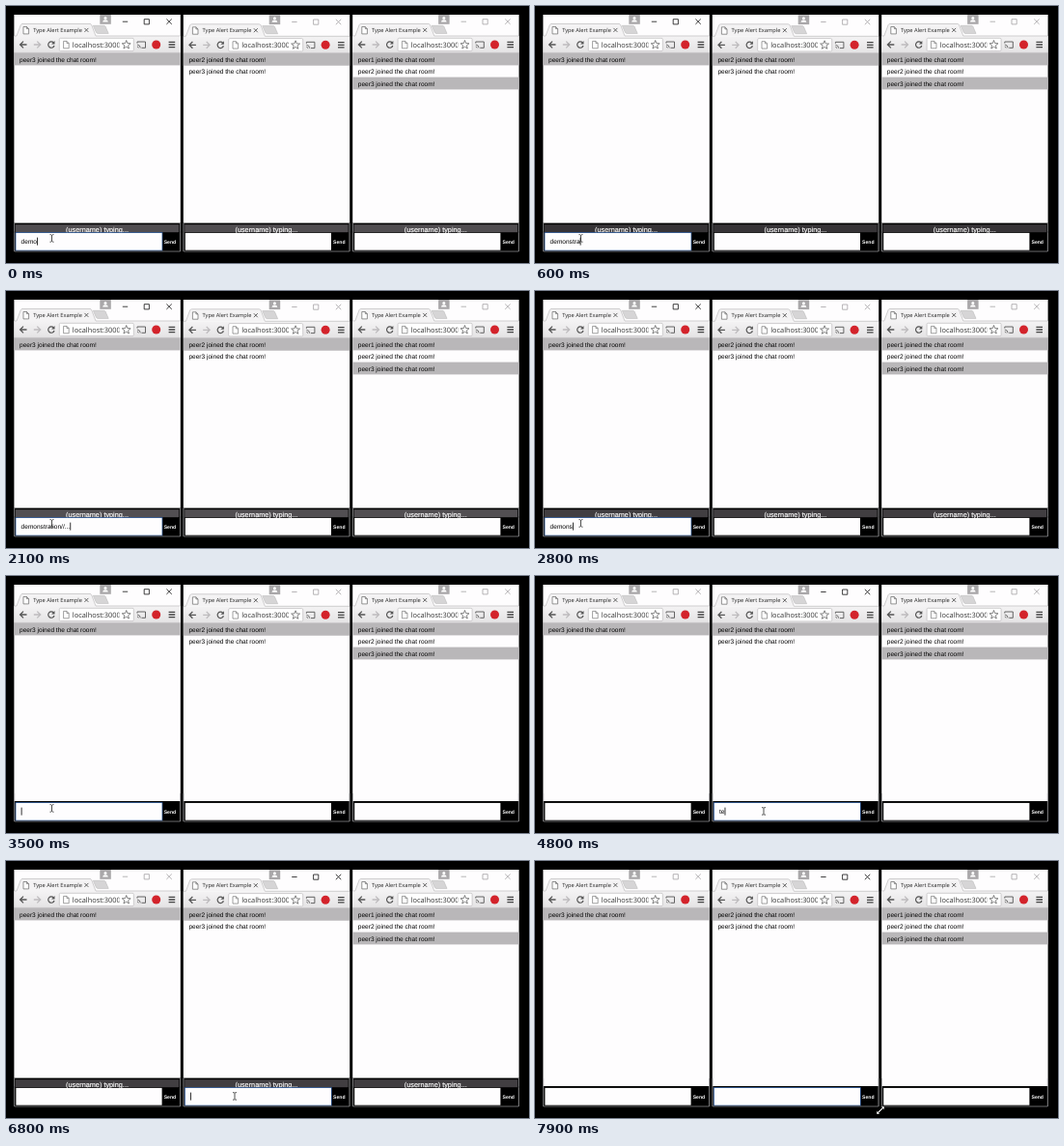
Recreate the animation shown at these times as an HTML page. Size 542x266 px, loop 8 s.

```html
<!DOCTYPE html>
<html lang="en">
<head>
<meta charset="utf-8">
<title>Type Alert Example</title>
<style>
  html, body { margin: 0; width: 100%; height: 100%; overflow: hidden; background: #000; }
  svg { display: block; width: 542px; height: 266px; }
  text { font-family: "Liberation Sans", Arial, sans-serif; font-size: 6.56px; fill: #000; text-rendering: geometricPrecision; white-space: pre; }
  .ui { font-family: "Open Sans", "Noto Sans", sans-serif; fill: #333; }
  .title { font-size: 5.7px; fill: #222; }
  .url { font-size: 7.4px; }
  .send { font-size: 5.1px; font-weight: bold; fill: #fff; }
  .alert { font-size: 7.3px; fill: #fff; stroke: #fff; stroke-width: .15px; text-anchor: middle; }
  .field { fill: #fefdfe; stroke-width: 1.5px; paint-order: stroke; }
</style>
</head>
<body>
<svg id="stage" viewBox="0 0 542 266">
  <defs>
    <linearGradient id="tool" x1="0" y1="0" x2="0" y2="1">
      <stop offset="0" stop-color="#f4f3f4"/><stop offset="1" stop-color="#e4e3e4"/>
    </linearGradient>
    <clipPath id="urlClip"><rect x="57" y="33" width="60.5" height="14"/></clipPath>
    <g id="chrome">
      <rect x="8.4" y="31" width="172.4" height="17.5" fill="url(#tool)"/>
      <path d="M8.5 31H11L15.3 19.6Q15.8 18.5 17 18.5H87Q88.2 18.5 88.7 19.6L93 31H180.5" fill="#f4f3f4" stroke="#bcbabc" stroke-width=".7"/>
      <path d="M90.3 20.3H101.5Q102.6 20.3 103.1 21.3L106.2 28.4H95.2Q94 28.4 93.4 27.3Z" fill="#d6d5d6" stroke="#bbb" stroke-width=".6"/>
      <path d="M18 21.5H21.5L23.6 23.6V28.9H18ZM21.5 21.5V23.6H23.6" fill="#fff" stroke="#666" stroke-width=".7"/>
      <text class="ui title" x="28.2" y="27.2">Type Alert Example</text>
      <path d="M81.4 22.9L85.4 26.9M85.4 22.9L81.4 26.9" stroke="#555" stroke-width=".9"/>
      <rect x="97.3" y="9" width="11.5" height="9.8" fill="#aaa8aa"/>
      <circle cx="103" cy="12.4" r="1.5" fill="#fff"/>
      <path d="M100.1 16.5Q100.3 14.3 103 14.3Q105.7 14.3 105.9 16.5Z" fill="#fff"/>
      <path d="M21.5 40H14.7M18 36.6L14.6 40L18 43.4" fill="none" stroke="#555" stroke-width="1.3"/>
      <path d="M28.8 40H35.6M32.3 36.6L35.7 40L32.3 43.4" fill="none" stroke="#bdbbbd" stroke-width="1.3"/>
      <path d="M49.4 38A3.2 3.2 0 1 0 50 41" fill="none" stroke="#555" stroke-width="1.2"/>
      <path d="M50.5 36V39.4H47.1Z" fill="#555"/>
      <rect x="55.3" y="33.3" width="77" height="13.3" rx="1.2" fill="#fff" stroke="#bdbbbd" stroke-width=".7"/>
      <path d="M59.6 36.4H63L65.2 38.6V43.8H59.6ZM63 36.4V38.6H65.2" fill="#fff" stroke="#777" stroke-width=".7"/>
      <text class="ui url" x="68.8" y="42.7" clip-path="url(#urlClip)">localhost:3000</text>
      <path id="star" fill="#fff" stroke="#666" stroke-width=".8"/>
      <path d="M136 38.5V37H144.5V43.3H140.5" fill="none" stroke="#555" stroke-width=".9"/>
      <path d="M136 40A3.6 3.6 0 0 1 139.3 43.4M136 42A1.5 1.5 0 0 1 137.3 43.4" fill="none" stroke="#555" stroke-width=".8"/>
      <circle cx="155.7" cy="40" r="4.5" fill="#d3232b"/>
      <path d="M168.6 37.4H175.2M168.6 40H175.2M168.6 42.6H175.2" stroke="#444" stroke-width="1.3"/>
      <path d="M8.5 48.4H180.5" stroke="#b0aeb0" stroke-width=".6"/>
    </g>
  </defs>
  <rect width="542" height="266"/>
  <g id="windows"></g>
  <g id="pointer">
    <path id="beam" d="M-2 -3.8Q-.3 -3.8 0 -3Q.3 -3.8 2 -3.8M0 -3V3M-2 3.8Q-.3 3.8 0 3Q.3 3.8 2 3.8" fill="none" stroke="#222" stroke-width=".8"/>
    <path id="arrow" d="M0 0V8L1.9 6.3L3.2 9.1L4.4 8.5L3.1 5.8H5.7Z" fill="#fff" stroke="#000" stroke-width=".5"/>
    <path id="resize" d="M4 -4V-.6L2.8 -1.8L-1.8 2.8L-.6 4H-4V.6L-2.8 1.8L1.8 -2.8L.6 -4Z" fill="#fff" stroke="#000" stroke-width=".4"/>
  </g>
</svg>
<script>
const LOOP = 8000, BLINK = 530, EM = 6.56;
const $ = id => document.getElementById(id);
const show = (el, on) => el.setAttribute("visibility", on ? "visible" : "hidden");

$("star").setAttribute("d", "M" + Array.from({ length: 10 }, (_, i) => {
  const a = i * Math.PI / 5 - Math.PI / 2, r = i % 2 ? 2 : 4.7;
  return (124.7 + r * Math.cos(a)).toFixed(2) + " " + (40.2 + r * Math.sin(a)).toFixed(2);
}).join("L") + "Z");

const layout = [
  { dx: 0, dy: 0, names: ["peer3"] },
  { dx: 175.4, dy: .3, names: ["peer2", "peer3"] },
  { dx: 350.8, dy: 0, names: ["peer1", "peer2", "peer3"] }
];

function windowMarkup({ dx, dy, names }) {
  const rows = names.map((name, i) => {
    const y = 48.6 + i * 12.5;
    return (i % 2 ? "" : `<rect x="8.4" y="${y}" width="172.4" height="12.8" fill="#b9b7b9"/>`) +
      `<text x="14" y="${y + 9}">${name} joined the chat room!</text>`;
  }).join("");
  return `<g transform="translate(${dx} 0)">
    <rect x="8.4" y="9" width="172.4" height="245" fill="#fefdfe"/>
    <g transform="translate(0 ${dy})"><use href="#chrome"/>
      <path class="ctl" d="M120.8 16.2H126.2M143.2 13.7H148.4V18.9H143.2ZM166.4 13.5L171.8 18.9M171.8 13.5L166.4 18.9" fill="none" stroke-width=".8"/>
      ${rows}</g>
    <rect x="8.4" y="233" width="172.4" height="21"/>
    <g class="bar"><rect x="8.4" y="224.6" width="172.4" height="10.4"/>
      <rect class="fill" x="9.8" y="226.2" width="169.4" height="8"/>
      <text class="alert" x="94.5" y="233.5">(username) typing...</text></g>
    <rect class="field" x="10.4" y="234.9" width="151.2" height="17.8"/>
    <text class="value" x="15.6" y="246"></text>
    <rect class="caret" y="239.6" width=".8" height="8"/>
    <text class="send" x="163.7" y="245.5">Send</text>
    <path d="M8.7 225V254H180.5V225" fill="none" stroke="#9a9a9c" stroke-width=".7"/>
  </g>`;
}

$("windows").innerHTML = layout.map(windowMarkup).join("");
const wins = [...$("windows").children].map(g => {
  const part = c => g.querySelector("." + c);
  return { ctl: part("ctl"), bar: part("bar"), fill: part("fill"), field: part("field"), value: part("value"), caret: part("caret") };
});

// Advance widths in em of the letters typed
const adv = { m: .833, s: .5, t: .278, r: .333, i: .222, "/": .278, ".": .278 };
const width = s => [...s].reduce((w, c) => w + (adv[c] || .556), 0) * EM;

const typed = [
  { text: "demonstration//...", start: 4, focus: 0,
    keys: [100, 220, 330, 450, 560, 690, 820, 930, 1050, 1290, 1430, 1700, 1840, 1980], erase: [2430, 3000] },
  { text: "testing.", start: 0, focus: 4400,
    keys: [4600, 4740, 4930, 5080, 5220, 5370, 5500, 5640], erase: [6060, 6300] }
];

function entry({ text, start, focus, keys, erase: [from, to] }, t) {
  const hit = keys.filter(k => k <= t);
  let n = start + hit.length, last = hit.length ? hit[hit.length - 1] : focus;
  if (t >= from) {
    const p = Math.min(1, (t - from) / (to - from));
    n = Math.round(text.length * (1 - p));
    last = Math.min(t, to);
  }
  return { value: text.slice(0, n), lit: (t - last) % (2 * BLINK) < BLINK };
}

// time, x, y
const path = [[0, 47.5, 240.4], [3600, 47.5, 240.4], [4250, 237, 243.4], [7360, 237, 243.4], [7820, 358, 258], [LOOP, 358, 258]];

function pointerAt(t) {
  const i = path.findIndex(p => p[0] > t), a = path[i - 1], b = path[i];
  const p = (t - a[0]) / (b[0] - a[0]), e = p * p * (3 - 2 * p);
  return [a[1] + (b[1] - a[1]) * e, a[2] + (b[2] - a[2]) * e];
}

function draw(t) {
  const focus = t < 4400 ? 0 : 1;
  const alert = t < 3200 || (t >= 4900 && t < 6850);
  const l = Math.round(68 + 14 * Math.cos((t / 1000 - .08) * 2 * Math.PI));
  wins.forEach((w, i) => {
    const on = i === focus;
    w.ctl.setAttribute("stroke", on ? "#111" : "#a5a3a5");
    show(w.bar, alert);
    w.fill.setAttribute("fill", `rgb(${l},${l - 3},${l})`);
    w.field.setAttribute("stroke", on ? "#2a5799" : "none");
    const { value, lit } = typed[i] ? entry(typed[i], t) : { value: "", lit: false };
    if (w.value.textContent !== value) w.value.textContent = value;
    w.caret.setAttribute("x", 15.7 + width(value));
    show(w.caret, on && lit);
  });
  const [x, y] = pointerAt(t);
  $("pointer").setAttribute("transform", `translate(${x} ${y})`);
  const inField = layout.some(({ dx }) => x > 11 + dx && x < 161 + dx) && y < 253;
  const atCorner = x > 354;
  show($("beam"), inField);
  show($("resize"), atCorner);
  show($("arrow"), !inField && !atCorner);
}

const begin = performance.now();
function tick() {
  draw((performance.now() - begin) % LOOP);
  requestAnimationFrame(tick);
}
draw(0);
requestAnimationFrame(tick);
</script>
</body>
</html>
```
